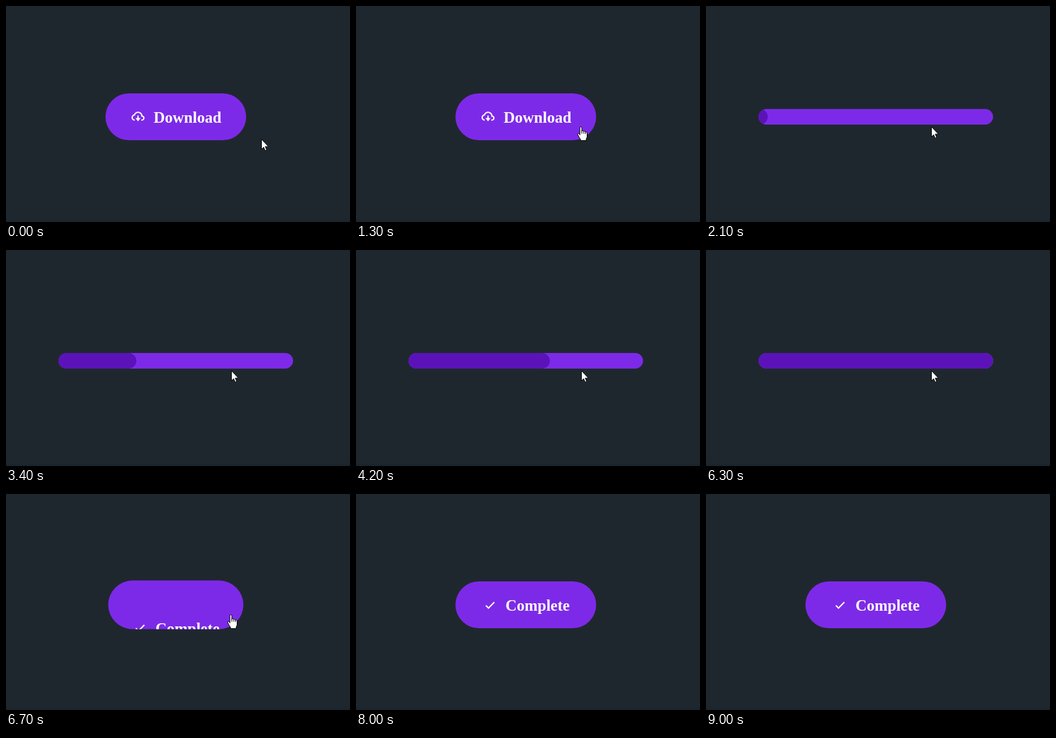
Write an HTML page that moves like this. It is 550 px wide and 346 px high and loops after 9.4 s.

```html
<!DOCTYPE html>
<html lang="en">
<head>
<meta charset="utf-8">
<title>Download button</title>
<style>
  html, body { margin: 0; width: 100%; height: 100%; overflow: hidden; background: #1f272e; }
  svg { display: block; width: 100%; height: 100%; }
  text { font: bold 25px "Liberation Serif", "Times New Roman", serif; }
  .cursor { fill: #fff; stroke: #000; stroke-width: 1; stroke-linejoin: round; }
</style>
</head>
<body>
<svg viewBox="0 0 550 346">
  <defs>
    <clipPath id="clip"><rect class="shape"/></clipPath>
  </defs>
  <rect width="550" height="346" fill="#1f272e"/>
  <rect y="342" width="550" height="4" fill="#1b252d"/>
  <rect class="shape" fill="#7d2ae8"/>
  <g clip-path="url(#clip)">
    <rect id="layer" fill="#5b13b9"/>
    <g id="content" fill="#fff">
      <g id="before">
        <g transform="translate(198.6 165) scale(1.0417)">
          <path d="M18.944 10.112C18.507 6.67 15.56 4 12 4 9.244 4 6.85 5.611 5.757 8.15 3.609 8.792 2 10.819 2 13c0 2.757 2.243 5 5 5v-2c-1.654 0-3-1.346-3-3 0-1.403 1.199-2.756 2.673-3.015l.581-.102.192-.558C8.149 7.274 9.895 6 12 6c2.757 0 5 2.243 5 5v1h1c1.103 0 2 .897 2 2s-.897 2-2 2h-1v2h1c2.206 0 4-1.794 4-4a4.008 4.008 0 0 0-3.056-3.888z"/>
          <path d="M13 14v-4h-2v4H8l4 5 4-5z"/>
        </g>
        <text x="236" y="187">Download</text>
      </g>
      <g id="after">
        <path transform="translate(201.4 165) scale(1.0417)" d="M10 15.586 6.707 12.293 5.293 13.707 10 18.414l9.707-9.707-1.414-1.414z"/>
        <text x="238.9" y="187">Complete</text>
      </g>
    </g>
  </g>
  <g id="arrow" class="cursor">
    <path d="M.5 .5V16.5L4 13.2 6.4 18.6 8.8 17.6 6.5 12.2H11.6Z"/>
  </g>
  <g id="hand" class="cursor">
    <path d="M-2 2Q-2 .5 -.5 .5T1 2V7.5Q1.5 6.5 2.7 6.7T4 8Q4.5 7.3 5.6 7.6T6.8 9Q7.5 8.4 8.5 9T9.5 11V16Q9.5 18 8 20V22.5H-1V20.5Q-3 18.5 -4 15.5L-5.5 13Q-6 11.5 -5 11T-3 12L-2 13.5Z"/>
    <path d="M1 7V11.5M4 8V11.5M6.8 9V12" fill="none"/>
  </g>
</svg>
<script>
const LOOP = 9400, STEP = 100;
const CLICK = 1400, DONE = 6426, FILL = 5000;
const CX = 271.5, CY = 177.5;
const $ = id => document.getElementById(id);
const shapes = document.querySelectorAll('.shape');

function bezier(x1, y1, x2, y2) {
  const at = (a, b, s) => 3 * (1 - s) ** 2 * s * a + 3 * (1 - s) * s * s * b + s ** 3;
  return x => {
    if (x <= 0) return 0;
    if (x >= 1) return 1;
    let lo = 0, hi = 1;
    for (let i = 0; i < 30; i++) {
      const mid = (lo + hi) / 2;
      if (at(x1, x2, mid) < x) lo = mid; else hi = mid;
    }
    return at(y1, y2, lo);
  };
}
const ease = bezier(.25, .1, .25, 1);
const easeInOut = bezier(.42, 0, .58, 1);
const back = bezier(.68, -.55, .265, 1.55);

const setBox = (el, x, y, w, h) => {
  const box = { x, y, width: w, height: h, rx: h / 2 };
  for (const key in box) el.setAttribute(key, box[key]);
};
const show = (el, on) => el.setAttribute('visibility', on ? 'visible' : 'hidden');
const move = (el, x, y) => el.setAttribute('transform', `translate(${x} ${y})`);

// Is the point inside the pill?
function inside(px, py, w, h) {
  const dx = Math.max(0, Math.abs(px - CX) - (w - h) / 2);
  return Math.hypot(dx, py - CY) < h / 2;
}

function draw(t) {
  const active = t >= CLICK && t < DONE;

  const k = back((t - CLICK) / 400) - back((t - DONE) / 400);
  const w = 225 + 150 * k, h = 75 - 50 * k;
  const x = CX - w / 2, y = CY - h / 2;
  shapes.forEach(el => setBox(el, x, y, w, h));

  const p = easeInOut((t - CLICK) / FILL);
  setBox($('layer'), x - w * (1 - p), y, w, h);
  show($('layer'), active);

  const drop = ease((t - CLICK - 200) / 200) - ease((t - DONE - 214) / 200);
  move($('content'), 0, 75 * drop);
  show($('before'), t < DONE);
  show($('after'), t >= DONE);

  const m = easeInOut((t - 700) / 600);
  const mx = Math.round(408 - 48 * m), my = Math.round(213 - 20 * m);
  const over = inside(mx, my, w, h);
  const seen = t < 8000 || (t >= 8100 && t < 8500);
  for (const id of ['arrow', 'hand']) {
    move($(id), mx, my);
    show($(id), seen && over === (id === 'hand'));
  }
}

const start = performance.now();
function tick() {
  const t = (performance.now() - start) % LOOP;
  draw(Math.floor(t / STEP) * STEP);
  requestAnimationFrame(tick);
}
tick();
</script>
</body>
</html>
```
